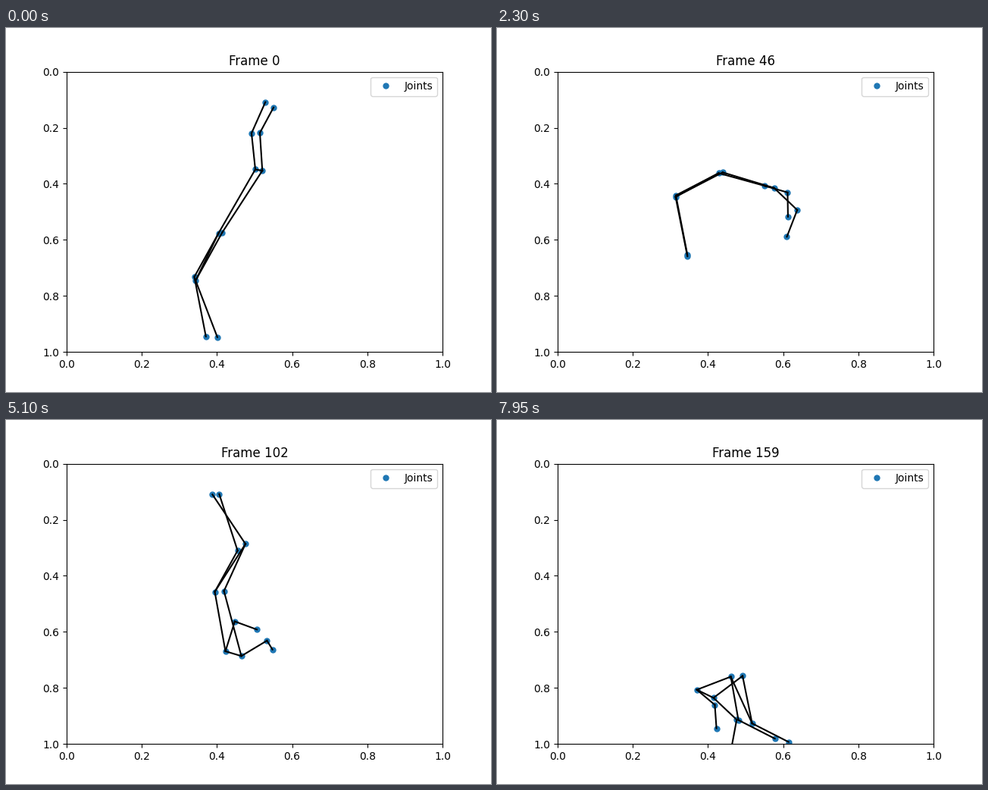
A matplotlib script for the animation above (8 s loop, 640 by 480 pixels).

```python
import numpy as np
import matplotlib.pyplot as plt
from matplotlib.animation import FuncAnimation

FRAMES = 160
T = np.arange(FRAMES)


def curve(*keys):
    """Monotone cubic through (time, value) keys, sampled at every step."""
    t, v = np.array(keys, float).T
    h = np.diff(t)
    s = np.diff(v) / h
    m = np.concatenate([s[:1], np.zeros(len(s) - 1), s[-1:]])
    for k in range(1, len(s)):
        if s[k - 1] * s[k] > 0:
            a, b = 2 * h[k] + h[k - 1], h[k] + 2 * h[k - 1]
            m[k] = (a + b) / (a / s[k - 1] + b / s[k])
    i = np.clip(np.searchsorted(t, T, side="right") - 1, 0, len(h) - 1)
    u = (T - t[i]) / h[i]
    return (v[i] + (v[i + 1] - v[i]) * u**2 * (3 - 2 * u)
            + h[i] * u * (1 - u) * ((1 - u) * m[i] - u * m[i + 1]))


def bump(center, width):
    return np.exp(-0.5 * ((T - center) / width) ** 2)


def limb(base, angle, length):
    """End point of a limb; angles in degrees, clockwise from the right."""
    a = np.radians(angle)
    return base + np.column_stack([length * np.cos(a), length * np.sin(a)])


# The hips rise and fall; every limb swings from there, in pixels
hip_a = np.column_stack([
    curve((0, 280), (28, 280), (56, 297), (85, 286), (102, 275), (159, 308)),
    curve((0, 270), (28, 212), (58, 185), (102, 226), (124, 250), (159, 338))])
hip_b = hip_a + np.column_stack([6 + 0.06 * T - 8 * bump(28, 14), -1 + 0 * T])

lean = curve((0, -60), (28, -27), (63, 52), (124, 97), (159, 159))
trunk = curve((0, 97), (56, 61), (90, 80), (124, 78), (159, 48))
shoulder_a = limb(hip_a, lean, trunk)
shoulder_b = limb(hip_b, lean + 3 - 19 * (T / 159) ** 2,
                  trunk + 10 * np.sin(np.pi * T / 159))

thigh = curve((0, 119), (28, 110), (63, 215), (85, 270),
              (102, 299), (124, 396), (159, 440))
thigh_len = 66 - 0.05 * T + 11 * bump(85, 8)
knee_a = limb(hip_a, thigh, thigh_len)
knee_b = limb(hip_b, thigh - 16 * bump(126, 15), thigh_len * 1.1)

shin = curve((0, 79), (63, 79), (85, 192), (102, 252), (124, 280), (159, 387))
shin_len = 80 - 15 * bump(85, 8) - 35 * bump(149, 13)
ankle_a = limb(knee_a, shin, shin_len)
ankle_b = limb(knee_b, shin - 26 * bump(88, 14) - 10 * bump(0, 10), shin_len)

arm = curve((0, -96), (28, 10), (63, 18), (85, -77), (124, -57), (159, 40))
elbow_a = limb(shoulder_a, arm, 31 + 17 * bump(0, 15) + 12 * bump(93, 16))
elbow_b = limb(shoulder_b, arm + 50 * bump(82, 33),
               42 + 8 * bump(0, 15) - 15 * bump(85, 9))

fore = curve((0, -66), (28, 63), (63, 99), (85, 13), (124, 40), (159, 86))
wrist_a = limb(elbow_a, fore, 31 + 14 * bump(0, 20))
wrist_b = limb(elbow_b, fore + 40 * bump(95, 45) - 60 * bump(85, 6),
               38 - 27 * bump(95, 15))

BODY = np.stack([shoulder_a, shoulder_b, elbow_a, elbow_b, wrist_a, wrist_b,
                 hip_a, hip_b, knee_a, knee_b, ankle_a, ankle_b], axis=1)
BODY = (BODY + 0.5 - [80, 57.6]) / [496, 369.6]

BONES = [(0, 1), (0, 2), (2, 4), (1, 3), (3, 5), (0, 6), (1, 7),
         (6, 8), (6, 9), (7, 9), (8, 10), (9, 11)]

fig, ax = plt.subplots(figsize=(6.4, 4.8), dpi=100)
ax.set_xlim(0, 1)
ax.set_ylim(1, 0)
dots, = ax.plot([], [], "o", color="tab:blue", markersize=5, label="Joints")
lines = [ax.plot([], [], "k-")[0] for _ in BONES]
title = ax.set_title("Frame 0")
ax.legend(loc="upper right")


def draw(n):
    pose = BODY[n]
    dots.set_data(pose[:, 0], pose[:, 1])
    for line, (a, b) in zip(lines, BONES):
        line.set_data(pose[[a, b], 0], pose[[a, b], 1])
    title.set_text(f"Frame {n}")
    return [dots, title, *lines]


anim = FuncAnimation(fig, draw, frames=FRAMES, interval=50, repeat=True)
plt.show()
```
